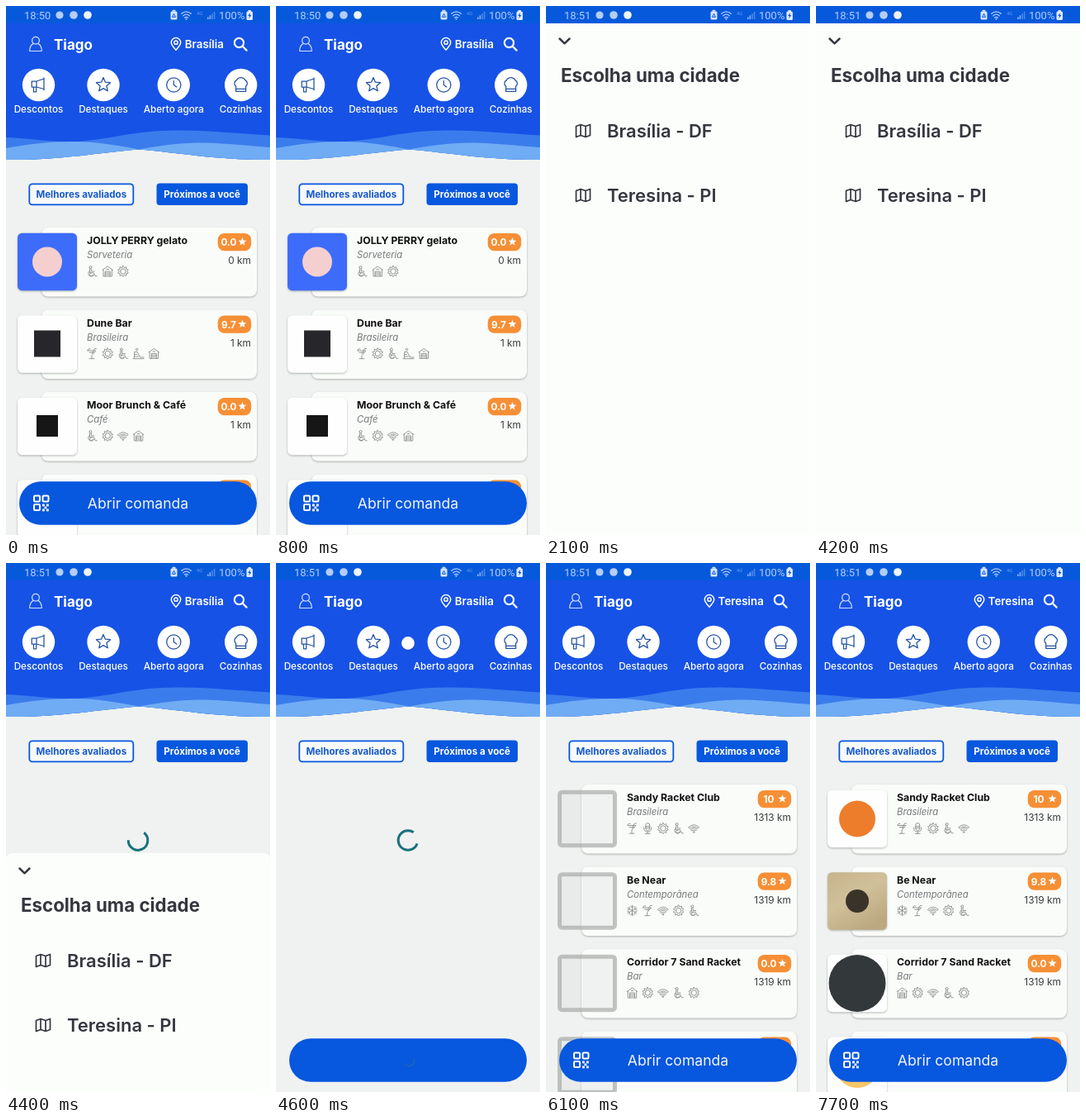
These frames come from a looping animation (320x640 px, 7.8 s). An HTML page:

```html
<!DOCTYPE html>
<html lang="pt-BR">
<head>
<meta charset="utf-8">
<title>Comanda</title>
<style>
  html, body { margin: 0; width: 100%; height: 100%; overflow: hidden; background: #eff2f0; }
  svg { display: block; width: 100vw; height: 100vh; }
  text { font-family: Inter, "Open Sans", sans-serif; white-space: pre; }
  .sys { font-family: Roboto, Arial, sans-serif; }
  .line { fill: none; stroke-linecap: round; stroke-linejoin: round; }
  .lift { filter: drop-shadow(0 1px 1.2px rgba(0, 0, 0, .28)); }
</style>
</head>
<body>
<svg id="stage" viewBox="0 0 320 640" xmlns="http://www.w3.org/2000/svg"></svg>
<script>
const LOOP = 7800, STEP = 100;
const BLUE = '#0757df', HEAD = '#1652e6', INK = '#35363e', PALE = '#b4cdfa';

const txt = (x, y, s, size, weight = 400, fill = '#111', more = '') =>
  `<text x="${x}" y="${y}" font-size="${size}" font-weight="${weight}" fill="${fill}" ${more}>${s}</text>`;
const rect = (x, y, w, h, r, fill, more = '') =>
  `<rect x="${x}" y="${y}" width="${w}" height="${h}" rx="${r}" fill="${fill}" ${more}/>`;
const dot = (x, y, r, fill, more = '') =>
  `<circle cx="${x}" cy="${y}" r="${r}" fill="${fill}" ${more}/>`;
const line = (d, color, width, more = '') =>
  `<path class="line" d="${d}" stroke="${color}" stroke-width="${width}" ${more}/>`;
const at = (x, y, body, more = '') => `<g transform="translate(${x} ${y})" ${more}>${body}</g>`;
const group = (id, body) => `<g id="${id}">${body}</g>`;
const MID = 'text-anchor="middle"', END = 'text-anchor="end"';

// Points alternating between two radii
function star(n, outer, inner) {
  const pts = [];
  for (let i = 0; i < n * 2; i++) {
    const a = Math.PI * (i / n - .5), r = i % 2 ? inner : outer;
    pts.push((r * Math.cos(a)).toFixed(2) + ' ' + (r * Math.sin(a)).toFixed(2));
  }
  return 'M' + pts.join('L') + 'Z';
}

function polar(x, y, r, deg) {
  const a = deg * Math.PI / 180;
  return `${(x + r * Math.cos(a)).toFixed(2)} ${(y + r * Math.sin(a)).toFixed(2)}`;
}

const arc = (x, y, r, from, sweep) =>
  `M${polar(x, y, r, from)}A${r} ${r} 0 ${sweep > 180 ? 1 : 0} 1 ${polar(x, y, r, from + sweep)}`;

const ring = (r, x = 0, y = 0) => `M${x - r} ${y}a${r} ${r} 0 1 0 ${2 * r} 0a${r} ${r} 0 1 0 ${-2 * r} 0`;

// One arm of a snowflake with its two twigs
const arm = deg => `M0 0L${polar(0, 0, 6.4, deg)}M${polar(0, 0, 5.6, deg - 22)}L${polar(0, 0, 3.6, deg)}L${polar(0, 0, 5.6, deg + 22)}`;

// Amenity glyphs, centred on 0,0
const AMENITY = {
  chair: ring(1.5, -2, -5) + 'M-3 -3.2V1.8H2L3.8 5.8H5.8M-1.2 -3.2V0H2.4M-3.4 -.4A3.7 3.7 0 1 0 2.2 4.2M-1.2 1.8A2 2 0 1 0 1 4',
  house: 'M-6.3 -1.5L0 -6L6.3 -1.5M-5.2 -2V6H5.2V-2M-3 6V0H3V6M-3 2H3M-3 4H3M-1.2 -2.5H1.2',
  sun: ring(3.2) + star(10, 6.6, 4.7),
  drink: 'M-5.5 -3.5H4.5L-.5 2V6M-3.5 6.2H2.5M-3.5 -1.3H2.5M0 -.5L3 -6H5M-5.5 -3.5A2 2 0 0 1 -2.5 -5.5',
  slide: ring(1.2, -2, -5) + 'M-5 6V-2H-1.5L2 4.5H6.5M-5 1H-2M-5 3.5H0M-6.5 6.2H6.5',
  wifi: 'M-6.3 -1.5Q0 -7 6.3 -1.5L4.9 0Q0 -4 -4.9 0ZM-3.6 1.4Q0 -2 3.6 1.4L2.3 2.8Q0 1 -2.3 2.8Z' + ring(.9, 0, 4.6),
  mic: 'M-2.5 -4Q-2.5 -6.4 0 -6.4T2.5 -4V0Q2.5 2.4 0 2.4T-2.5 0ZM-4.5 -1V0Q-4.5 4 0 4T4.5 0V-1M0 4V6.4M-3 6.4H3M-2.5 -2.5H2.5M-2.5 -.5H2.5',
  snow: [30, 90, 150, 210, 270, 330].map(arm).join('')
};

const CITIES = {
  first: [
    { name: 'JOLLY PERRY gelato', kind: 'Sorveteria', rate: '0.0', km: '0 km', icons: 'chair house sun',
      tile: '#3d6cfb', mark: dot(50, 309.5, 18, '#f5cfd0') },
    { name: 'Dune Bar', kind: 'Brasileira', rate: '9.7', km: '1 km', icons: 'drink sun chair slide house',
      tile: '#fdfefd', mark: rect(34, 293, 32, 32, 0, '#27262a') },
    { name: 'Moor Brunch &amp; Café', kind: 'Café', rate: '0.0', km: '1 km', icons: 'chair sun wifi house',
      tile: '#fdfefd', mark: rect(37, 296, 26, 26, 0, '#161616') },
    { tile: '#fdfefd', mark: '' }
  ],
  second: [
    { name: 'Sandy Racket Club', kind: 'Brasileira', rate: '10', km: '1313 km', icons: 'drink mic sun chair wifi',
      tile: '#fdfefd', mark: dot(50, 309.5, 22, '#ee7d2b'), shown: 6300 },
    { name: 'Be Near', kind: 'Contemporânea', rate: '9.8', km: '1319 km', icons: 'snow drink wifi sun chair',
      tile: 'url(#paper)', mark: dot(50, 309.5, 14, '#3a3329'), shown: 6500 },
    { name: 'Corridor 7 Sand Racket', kind: 'Bar', rate: '0.0', km: '1319 km', icons: 'house sun wifi chair sun',
      tile: '#fdfefd', mark: dot(50, 309.5, 34.5, '#33383b'), shown: 6800 },
    { tile: '#fdfefd', mark: dot(50, 309.5, 27, '#f6c668'), shown: 7000 }
  ]
};

function card(v, i) {
  const badge = rect(256.7, 275, 40.5, 21.3, 8, '#f68f35');
  const details = !v.name ? '' :
    txt(98, 288, v.name, 12.3, 700) +
    txt(98, 305, v.kind, 11.3, 400, '#77797a', 'font-style="italic"') +
    v.icons.split(' ').map((k, n) => at(104.5 + n * 18.7, 321, line(AMENITY[k], '#858786', .85))).join('') +
    txt(270, 290, v.rate, 11.8, 700, '#fff', MID) +
    at(286.5, 285.3, `<path d="${star(5, 5.3, 2.3)}" fill="#fff"/>`) +
    txt(297, 312, v.km, 11.9, 400, '#3a3b3d', END);
  const image = `<g ${v.shown ? `data-shown="${v.shown}"` : ''}>` +
    rect(14, 274.7, 72, 69.5, 5.5, v.tile, 'class="lift"') + v.mark + '</g>';
  const blank = v.shown ? `<g data-until="${v.shown}">` +
    rect(16.5, 277.2, 67, 64.5, 3, '#d8dad9', 'fill-opacity=".3" stroke="#9b9d9c" stroke-opacity=".58" stroke-width="5"') + '</g>' : '';
  return at(0, i * 99.5, rect(43, 268, 261, 83.5, 8, '#fafcfa', 'class="lift"') + badge + details + blank + image);
}

const statusBar = () => {
  const bars = [0, 1, 2, 3].map(i => rect(244 + i * 2.6, 13.5 - i * 2.2, 1.6, 2.5 + i * 2.2, 0, PALE, `opacity="${i < 2 ? .75 : .4}"`)).join('');
  return rect(0, 0, 320, 21, 0, '#0759dc') +
    txt(22, 15.5, '18:50', 13, 400, PALE, 'class="sys" id="clock"') +
    dot(65, 11, 4.6, PALE) + dot(82, 11, 4.8, PALE) + dot(99, 11, 4.8, '#eef4ff') +
    rect(199.5, 6.5, 8, 10, 1.5, '#d5e3ff') + rect(201.7, 4.8, 3.6, 2, .5, '#d5e3ff') +
    line('M201.7 13L203.5 9.2L205.3 13Z', BLUE, 1) +
    at(218.5, 11.5, line('M-5.8 -2.2Q0 -7 5.8 -2.2M-3.8 .3Q0 -3 3.8 .3M-1.9 2.6Q0 1 1.9 2.6', PALE, 1.3) + dot(0, 4.2, 1, PALE)) +
    txt(231, 10.5, '4G', 6, 400, PALE, 'class="sys" opacity=".55"') + bars +
    txt(258, 15.5, '100%', 13, 400, PALE, 'class="sys"') +
    rect(291.5, 6.5, 7.5, 10.5, 1.5, '#e2ecff') + rect(293.5, 5, 3.5, 2, .5, '#e2ecff') +
    `<path d="M296 8L293.2 12H295L294.4 15.2L297.4 11H295.6Z" fill="${BLUE}"/>`;
};

const CATEGORIES = [
  [39.5, 'Descontos', 'M-8.3 -4.5H-2.5L6.5 -7.5V5L-2.5 2.5H-8.3ZM-2.5 -4.5V2.5M-6 2.5V8.3H-2.8V2.5M6.5 -8.6V6.2'],
  [118, 'Destaques', star(5, 9, 4.1)],
  [203.3, 'Aberto agora', ring(8.6) + 'M0 -5V0L3.5 2.5'],
  [284.7, 'Cozinhas', 'M-6 7.8V1.6A4.2 4.2 0 0 1 -5.4 -5.6A6 6 0 0 1 5.4 -5.6A4.2 4.2 0 0 1 6 1.6V7.8ZM-6 4.8H6']
];

// Two pale bands that cross in the middle, with a deeper one behind
const waves = () => {
  const foot = 'V186C260 187 215 178 161 173.5C108 178 60 187 0 186Z';
  return `<path d="M0 140H320${foot}" fill="${HEAD}"/>` +
    `<path d="M0 159C30 160 55 165 85 164C125 162 155 150 212 150.5C255 151 285 155 320 156.5${foot}" fill="#3b7cec"/>` +
    `<path d="M0 172C28 167 52 164 80 164C112 164 135 169 161 173.5C187 169 210 165 240 165.5C268 166 292 169 320 171${foot}" fill="#70acf4"/>`;
};

const header = () =>
  rect(0, 20, 320, 122, 0, HEAD) + waves() +
  at(36, 46, line(ring(4.4, 0, -4.2) + 'M-2.7 -.6C-6 1 -7.3 4.5 -7.3 8.5H7.3C7.3 4.5 6 1 2.7 -.6', '#d2e1ff', 1.2)) +
  txt(58, 53, 'Tiago', 17, 700, '#fff') +
  group('place',
    at(0, 0, line('M0 7.2C-3.5 3.3 -5.7 .7 -5.7 -1.8A5.7 5.7 0 0 1 5.7 -1.8C5.7 .7 3.5 3.3 0 7.2Z' + ring(2.1, 0, -1.8), '#fff', 1.5), 'id="pin"') +
    txt(264, 50.5, '', 13.4, 600, '#fff', END + ' id="city"')) +
  line(ring(5.6, 282.5, 44.5) + 'M287 49L291.6 53.6', '#fff', 2.2) +
  CATEGORIES.map(([x, label, d]) =>
    dot(x, 95.5, 19.7, '#fff') + at(x, 95.5, line(d, '#2150a8', 1.25)) +
    txt(x, 129, label, 11.7, 500, '#fff', MID)).join('');

const filters = () =>
  rect(28.3, 215.3, 126, 25, 3.5, '#f7faf9', `stroke="${BLUE}" stroke-width="1.8"`) +
  txt(91.3, 232, 'Melhores avaliados', 11.6, 700, '#1659cf', MID) +
  rect(182.5, 214.5, 110.5, 26.5, 4, BLUE) +
  txt(237.7, 232, 'Próximos a você', 11.6, 700, '#fff', MID);

function button() {
  const boxes = [[34, 592.5], [44.5, 592.5], [34, 603]].map(([x, y]) =>
    rect(x, y, 7, 7, 1.3, 'none', 'stroke="#fff" stroke-width="2"')).join('');
  const bits = [[44, 602.5], [49, 602.5], [46.5, 605.5], [44, 608.5], [49, 608.5]].map(([x, y]) =>
    rect(x, y, 2.8, 2.8, 0, '#fff')).join('');
  return rect(16, 575.3, 288, 52.5, 26.2, BLUE) +
    group('order', boxes + bits + txt(160, 608, 'Abrir comanda', 17.6, 400, '#f2f6ff', MID));
}

const mapIcon = y => at(45, y, line('M-8.5 -5.5L-3 -7.5L3 -5.5L8.5 -7.5V5.5L3 7.5L-3 5.5L-8.5 7.5ZM-3 -7.5V5.5M3 -5.5V7.5', INK, 1.7));
const sheet = () =>
  rect(0, 21, 320, 640, 7, '#fcfefb', 'id="paperTop"') +
  line('M16.5 39.5L22.5 45.3L28.5 39.5', INK, 2.5) +
  txt(18, 92, 'Escolha uma cidade', 22.3, 700, INK) +
  mapIcon(151) + txt(74, 159, 'Brasília - DF', 22, 600, INK) +
  mapIcon(229) + txt(74, 237, 'Teresina - PI', 22, 600, INK);

document.getElementById('stage').innerHTML =
  '<defs><linearGradient id="paper" x2=".6" y2="1"><stop stop-color="#c6b48b"/><stop offset=".5" stop-color="#d0c09a"/><stop offset="1" stop-color="#bca981"/></linearGradient></defs>' +
  rect(0, 0, 320, 640, 0, '#eff2f0') + header() + filters() +
  group('first', CITIES.first.map(card).join('')) +
  group('second', CITIES.second.map(card).join('')) +
  button() +
  group('loading', line('', '#17717f', 3, 'id="big" style="stroke-linecap:butt"') +
    line('', '#32728f', 1.6, 'id="small" opacity=".6"')) +
  group('refresh', dot(0, 0, 18, '#fbfdfc', 'class="lift"') + line('', '#222', 2.2, 'id="spin"')) +
  group('sheet', sheet()) + statusBar();

const $ = id => document.getElementById(id);
const show = (el, on) => el.setAttribute('visibility', on ? 'visible' : 'hidden');
const display = (el, on) => { el.style.display = on ? '' : 'none'; };

// [time, value] pairs, linear in between
function track(keys, t) {
  if (t <= keys[0][0]) return keys[0][1];
  for (let i = 1; i < keys.length; i++) {
    const [a, u] = keys[i - 1], [b, v] = keys[i];
    if (t <= b) return u + (v - u) * (t - a) / (b - a);
  }
  return keys[keys.length - 1][1];
}

const SHEET = [[1500, 620], [1600, 546], [1700, 290], [1800, 105], [1900, 25], [2000, 0],
  [4200, 0], [4300, 70], [4400, 330], [4500, 620]];
const PRESS = [[1300, 1], [1500, .6], [1700, .6], [1900, 1]];
const REFRESH = [[4500, 0], [4600, .44], [4800, 1], [5400, 1], [5600, 0]];
const PICKED = 4300, LOADED = 5400;

function render(t) {
  const loaded = t >= LOADED, loading = t >= PICKED && !loaded;
  $('clock').textContent = t < 900 ? '18:50' : '18:51';
  $('city').textContent = loaded ? 'Teresina' : 'Brasília';
  $('pin').setAttribute('transform', `translate(${loaded ? 198 : 206} 46)`);
  $('place').setAttribute('opacity', track(PRESS, t));
  display($('first'), t < PICKED);
  display($('second'), loaded);
  display($('loading'), loading);
  show($('order'), !loading);
  document.querySelectorAll('[data-shown]').forEach(el => display(el, t >= +el.dataset.shown));
  document.querySelectorAll('[data-until]').forEach(el => display(el, t < +el.dataset.until));

  const d = t - 4600, turn = d * .36;
  const wave = Math.cos(d / 1333 * 2 * Math.PI);
  $('big').setAttribute('d', arc(160, 335.5, 11.8, 20 + turn, 160 + 125 * wave));
  $('small').setAttribute('d', arc(161, 602, 6.5, -25 + turn, 105 + 60 * wave));

  const scale = track(REFRESH, t);
  display($('refresh'), scale > 0);
  $('refresh').setAttribute('transform', `translate(160 97) scale(${scale})`);
  $('spin').setAttribute('d', arc(0, 0, 7.5, turn - 90, 150 - 100 * wave));
  $('spin').setAttribute('opacity', scale < .6 ? 0 : 1);

  // The corners square off as the sheet meets the status bar
  const y = track(SHEET, t);
  display($('sheet'), y < 620);
  $('sheet').setAttribute('transform', `translate(0 ${y})`);
  $('paperTop').setAttribute('rx', Math.min(7, y));
}

function tick() {
  const t = performance.now() % LOOP;
  render(Math.floor(t / STEP) * STEP);
  requestAnimationFrame(tick);
}
tick();
</script>
</body>
</html>
```
